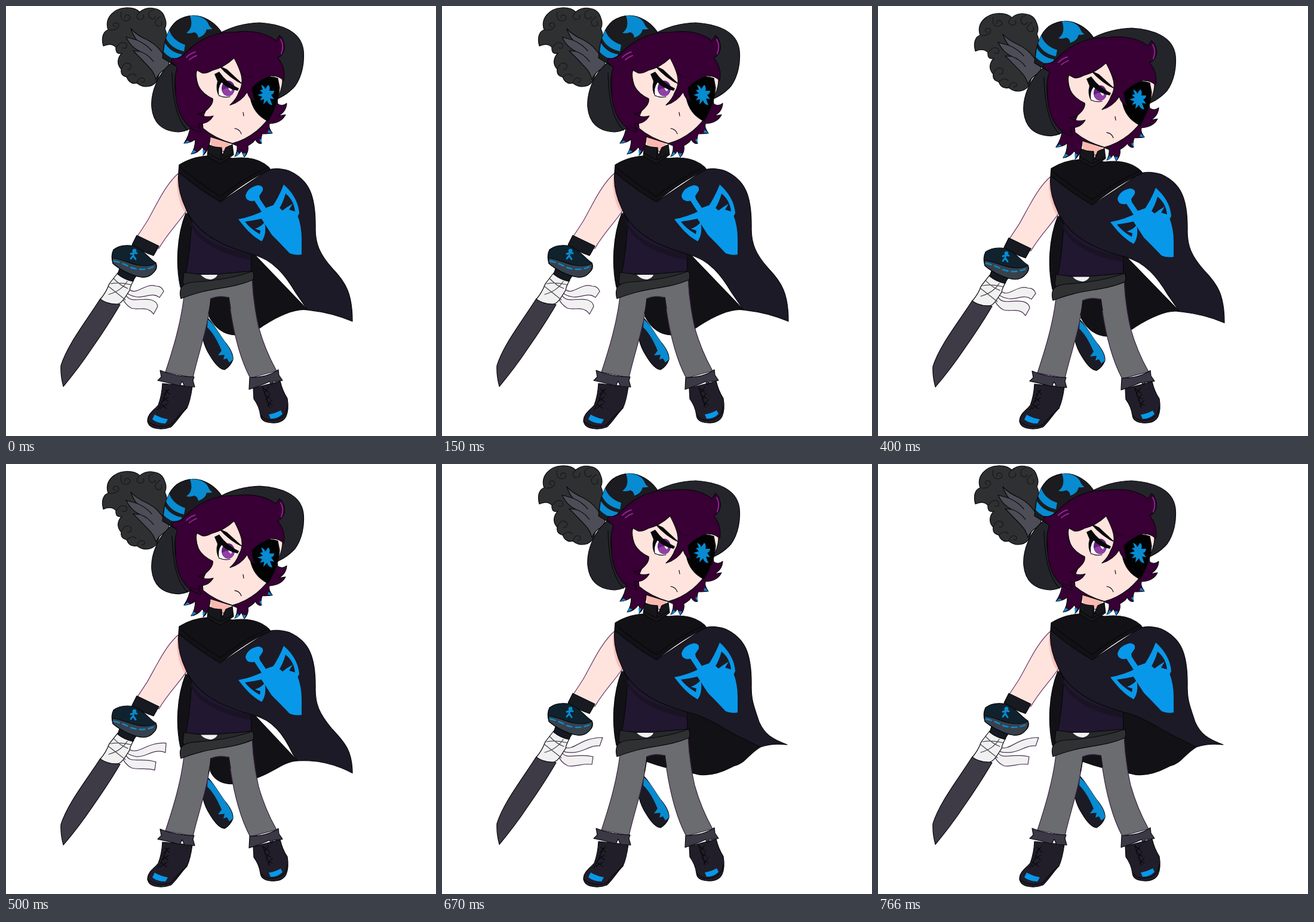
Recreate the animation shown at these times as an HTML page. Size 720x720 px, loop 830 ms.

```html
<!DOCTYPE html>
<html lang="en">
<head>
<meta charset="utf-8">
<title>Swordsman idle</title>
<style>
html, body { margin: 0; width: 100%; height: 100%; overflow: hidden; background: #fff }
svg { display: block; width: 100vw; height: 100vh }
.line { fill: none }
.blue { fill: #0898ea; stroke: none }
.dim { fill: #088bd0; stroke: none }
.skin { fill: #ffe4de }
.hair { fill: #380034 }
.boot { fill: #211e2a }
.cuff { fill: #3b3945 }
.ribbon { fill: #f1f1f1; stroke: #49304f }
</style>
</head>
<body>
<svg viewBox="0 0 720 720">
<g id="figure" stroke="#08080b" stroke-width="1.2" stroke-linejoin="round" stroke-linecap="round">

  <!-- cape lining and scabbard -->
  <path id="lining" fill="#121216"/>
  <path fill="#1b1b25" d="M337 522 C345 528 357 550 366 562 Q381 580 380 592 Q376 603 366 609 C356 608 348 596 342 586 Q333 572 330 558Z"/>
  <path class="dim" d="M338 525 C350 534 357 550 367 563 Q380 580 380 592 L374 597 370 590 364 592 366 584 355 585 361 577 357 568 C351 555 345 546 337 538Z"/>

  <!-- legs -->
  <path fill="#6a6c6f" stroke="#3f2347" d="M298 486 L412 456 C413 480 416 507 423 538 Q434 577 453 611 L409 623 C391 589 380 546 373 488 Q356 484 343 490 C339 535 324 575 313 622 L267 613 C280 573 293 531 298 486Z"/>
  <path class="line" d="M343 490 Q342 504 339 515 M373 488 L376 507"/>
  <path class="boot" d="M262 632 L312 637 C310 651 306 667 303 673 C294 682 285 697 276 705 Q263 710 250 707 Q237 704 237 693 C238 682 249 676 255 668 Q261 652 262 632Z"/>
  <path class="line" d="M270 643 Q259 670 254 676 M237 695 Q253 709 276 701 Q290 684 303 673 M266 642l8 8m-1-8l-9 9m-1 4l9 8m0-8l-11 8m-1 4l9 7m1-8l-12 8"/>
  <path class="cuff" d="M258 610 Q284 621 315 621 L313 627 316 638 299 637 295 628 291 636 Q273 631 254 627 L260 621Z"/>
  <path class="blue" d="M249 684 Q259 690 271 692 L267 699 Q253 699 245 692Z"/>
  <path class="boot" d="M414 640 L459 628 Q463 645 471 657 Q474 675 469 687 Q463 699 445 698 Q427 697 426 685 Q424 670 415 658Z"/>
  <path class="line" d="M429 637 Q437 657 441 672 M427 685 Q433 696 452 693 Q469 689 471 670 M431 640l9 7m0-9l-8 11m1 3l10 5m-1-8l-7 11m2 3l9 5m0-9l-8 11"/>
  <path class="cuff" d="M408 622 Q438 622 456 609 L457 618 463 627 447 629 445 634 441 629 Q426 636 407 642Z"/>
  <path class="blue" d="M440 684 Q451 682 460 677 L463 683 Q454 692 443 691Z"/>

  <!-- torso and belt -->
  <path fill="#211730" d="M303 346 L311 360 C309 395 307 420 301 447 L341 450 411 444 410 410 355 370Z"/>
  <path fill="#191323" stroke="none" d="M305 349 C317 390 363 408 410 415 L410 425 C360 416 326 398 310 369Z"/>
  <path fill="#28292b" d="M298 446 L330 450 354 449 411 444 413 452 300 470 296 463Z"/>
  <path fill="#f1f1f1" stroke="none" d="M326 450 H354 Q352 456 343 458 Q332 457 326 450Z"/>
  <path fill="#303133" d="M293 472 Q298 463 318 462 C350 460 386 454 413 444 Q416 451 414 458 C387 471 352 472 327 479 Q308 484 293 490 Q290 481 293 472Z"/>

  <!-- arm -->
  <path class="skin" stroke="#6d3367" d="M290 279 C267 298 251 335 236 361 L219 387 256 406 C271 380 289 363 302 343 Q293 317 290 279Z"/>
  <path fill="#fbc1bd" stroke="none" d="M289 281 Q286 288 286 298 Q288 329 299 345 L303 340 Q294 317 292 290Z"/>

  <!-- sword -->
  <path fill="#3e3b47" d="M158 490 L191 500 C176 526 160 550 144 573 Q122 606 96 637 Q91 618 92 602 C103 567 132 531 158 490Z"/>
  <path id="ribbonTop" class="ribbon"/>
  <path id="ribbonLow" class="ribbon"/>
  <path fill="#f1f1f1" d="M187 447 L214 459 Q208 469 207 476 C200 487 194 498 187 499 Q171 500 158 491 Q168 479 173 465Z"/>
  <path class="line" stroke="#454149" d="M180 456 Q191 468 204 473 M175 465 Q192 462 210 467 M171 469 Q190 484 200 492 M203 461 Q193 477 172 483"/>
  <path fill="#151922" d="M190 440 L218 452 212 461 Q198 458 187 449Z"/>
  <path fill="#171a20" d="M219 384 L256 402 247 418 Q227 411 211 400Z"/>
  <path fill="#10222e" d="M180 408 Q193 398 214 402 C232 409 240 424 251 430 Q255 439 247 446 Q239 455 227 454 C207 451 188 439 179 431 Q175 418 180 408Z"/>
  <path fill="#38414b" d="M178 422 C193 423 205 431 222 434 Q238 437 251 431 Q254 440 246 447 Q239 455 227 454 C207 451 188 439 179 431Z"/>
  <path class="line" stroke="#088bd0" stroke-width="2.4" stroke-dasharray="9 6" d="M181 427 Q195 430 207 437 Q227 445 246 437"/>
  <path class="line" stroke="#088bd0" stroke-width="3" d="M214 410 L213 418 209 423 M213 418 L217 424 M209 415 Q214 413 219 414"/>
  <circle class="dim" cx="215" cy="410" r="3.4"/>

  <!-- neck, cape and emblem -->
  <path id="cape" fill="#1c1a26"/>
  <path fill="#f9b9b1" stroke="none" d="M342 210 L377 223 373 240 358 246 343 236Z"/>
  <path fill="#121216" d="M290 266 Q313 252 338 251 L380 255 Q418 250 440 270 L443 274 C413 287 382 309 359 328 C336 315 311 297 289 278Z"/>
  <path class="line" d="M291 270 Q326 298 359 319 Q395 290 438 270"/>
  <path fill="#17171b" d="M339 232 Q348 237 361 237 L362 251 368 237 379 232 381 249 Q370 257 359 264 Q347 258 337 251Z"/>
  <path class="line" d="M338 246 Q350 254 360 258 L380 246 M360 239 V258 M363 243 l4 2 M362 249 l4 2"/>
  <g class="blue">
    <path d="M401 318 Q404 304 422 300 Q432 301 430 309 L424 318 425 323 435 338 452 332 459 339 467 346 488 350 Q495 369 495 390 L495 416 Q485 418 475 414 Q460 398 445 383 L425 352 429 346 416 326 Q403 329 401 318Z"/>
    <path fill-rule="evenodd" d="M435 341 Q412 353 389 357 C400 371 410 384 428 394 Q437 382 433 362 Q428 369 417 373 L426 376 425 382 Q409 373 400 361 Q417 359 436 354Z M444 339 Q457 320 465 299 C479 311 490 328 491 347 Q488 355 480 356 Q471 350 461 344 Q471 336 480 331 L474 341 484 344 Q482 325 468 314 Q464 330 455 343Z"/>
  </g>

  <!-- plume -->
  <path fill="#2f3031" d="M163 67 C159 53 163 42 171 40 C164 20 181 4 200 3 Q216 2 224 10 Q234 1 248 4 Q262 6 266 20 Q270 30 266 38 Q272 50 267 60 L272 96 Q257 108 254 122 C249 136 231 139 219 129 Q207 132 202 119 Q191 116 193 106 C183 95 189 84 194 79 Q183 82 184 69 Q176 61 163 67Z"/>
  <path class="line" stroke="#171719" d="M173 40 q12 2 16-7q-1-7-8-4q-4 4 2 6M193 10 q-3 15 9 15q10-4 3-10q-7-1-6 5M224 10q-10 9 0 13q9-1 6-8M248 6q-12 3-8 13q7 6 10-1M258 18q-14 9-4 16q9 0 6-8M185 69q9-13 17-5q2 9-7 6M193 106q6-16 16-8q2 9-6 8M202 119q10-9 16-2M219 129q4-13 13-7q1 7-5 5"/>
  <path fill="#4c4d56" d="M273 94 C258 74 254 66 237 57 C226 52 217 47 209 38 Q213 50 219 57 L201 52 Q209 69 224 76 L213 75 Q229 91 240 103 Q248 111 251 123 Q256 110 272 103Z"/>
  <path class="line" d="M219 57 Q235 64 244 75 M224 76 Q237 80 247 93"/>

  <!-- hat -->
  <path fill="#24252a" d="M276 96 C254 114 242 145 244 170 Q248 209 289 211 Q310 209 322 194 L440 160 Q466 154 484 134 C496 117 500 94 498 74 C494 42 460 30 425 28 Q388 29 357 46Z"/>
  <path fill="#1b1b20" d="M262 87 Q265 42 286 25 Q306 12 327 18 Q348 25 361 44 L325 78 285 101Z"/>
  <path class="dim" d="M273 40 Q279 58 300 65 L298 76 Q276 71 268 54Z M266 62 Q276 78 295 81 L289 91 Q273 87 264 77Z M308 16 Q330 15 338 28 Q341 36 346 38 Q340 40 336 39 Q334 49 322 53 Q321 45 315 44 Q308 47 302 45 Q315 36 308 16Z"/>
  <path class="line" d="M278 112 C279 151 284 188 304 208"/>

  <!-- hair behind the face -->
  <path class="hair" d="M287 103 C278 130 283 178 309 200 Q307 217 298 230 Q310 229 317 223 Q317 238 310 248 Q321 247 329 236 Q333 243 330 250 Q341 241 342 219 L377 230 387 234 Q388 244 383 252 Q391 249 394 242 L399 253 Q407 244 405 234 Q417 227 417 223 Q422 232 428 230 Q426 222 429 214 Q440 214 446 213 Q439 204 441 197 Q461 196 468 182 L456 184 Q469 177 470 163 Q463 169 455 164 L450 125Z"/>
  <path class="dim" d="M298 230 l6-5 4 3zM310 248l4-7 5 3zM330 250l-1-9 5 1zM383 252l5-8 3 4zM399 253l-3-7 6 1zM428 230l-4-6 4-2zM446 213l-6-6-2 5z"/>

  <!-- face -->
  <path class="skin" d="M320 105 Q393 67 461 105 Q467 129 456 151 C452 177 436 195 420 209 Q400 225 379 230 Q350 222 330 205 Q327 189 335 174 L341 155 Q319 142 318 113Z"/>
  <path fill="#fff" stroke="none" d="M357 124 L387 138 Q382 150 370 152 Q358 153 355 146Z"/>
  <ellipse cx="372" cy="138" rx="11" ry="13" fill="#652080" stroke="none"/>
  <path fill="#9140a5" stroke="none" d="M362 141 Q372 134 382 141 Q379 151 372 151 Q364 150 362 141Z"/>
  <path fill="#fff" stroke="none" d="M376 132 q4 4 1 11 q-5-3-5-8z"/>
  <path fill="#08070a" stroke="none" d="M349 114 L357 110 Q370 129 390 138 L388 142 Q371 139 361 128 Q354 137 357 152 Q350 140 354 126Z M355 99 L370 106 398 132 Q376 123 355 99Z"/>
  <path class="line" d="M357 150 Q365 154 375 152 M397 178 L398 184 M383 205 Q391 206 394 214"/>
  <path fill="#020203" d="M414 128 Q435 114 455 121 L458 137 Q456 163 439 193 Q414 181 409 153Z"/>
  <path class="dim" d="M427 132 Q433 134 434 139 L439 132 Q443 135 441 142 L449 142 Q449 147 444 149 L449 156 442 155 446 166 Q439 165 437 158 L431 165 432 156 425 158 429 152 421 149 430 146 425 141 430 140Z"/>

  <!-- fringe and side locks -->
  <path class="hair" d="M277 94 Q277 86 282 88 Q293 88 303 76 C324 54 354 43 382 44 Q427 38 452 58 L458 49 Q468 58 466 73 Q464 82 455 87 Q469 103 465 125 Q457 116 443 117 Q423 124 412 137 Q413 150 417 160 Q407 156 404 144 Q393 161 375 166 Q386 156 390 144 C401 127 393 108 382 87 Q365 103 345 108 Q334 114 328 112 L319 107 Q317 121 322 134 Q330 148 346 155 Q348 164 335 175 Q327 181 321 180 Q333 188 347 184 Q339 198 322 197 L326 211 C303 207 283 181 284 137 Q281 118 287 103Z"/>
  <path class="line" stroke="#8a288d" stroke-width="2" d="M302 86 Q309 79 317 77 M307 90 Q313 85 319 83 M460 56 Q466 66 461 80"/>
  <path class="line" stroke="#240020" d="M393 110 Q402 121 410 119 M309 200 Q320 205 326 204"/>
</g>
</svg>
<script>
const LOOP = 830, GROUND = 708;
const $ = id => document.getElementById(id);

// Resting, lifting and fully blown poses of the loose cloth.
// The front's lower edge follows `bend` to `corner`, then `hem` to the far side.
const poses = [
  {
    bend: "448 425 468 451 485 480", corner: "505 509",
    hem: "Q545 513 580 528 C580 481 569 463 546 439 C525 415 518 398 518 373",
    lining: "C485 505 454 520 431 535 Q408 552 384 551 Q356 550 340 520",
    top: "M207 475 C219 485 233 463 251 469 Q261 469 264 478 L257 488 C244 478 232 490 218 487 Q207 485 202 480Z",
    low: "M200 482 C206 499 226 488 243 492 Q253 495 254 503 L247 516 C237 501 222 510 210 506 Q198 499 195 488Z"
  },
  {
    bend: "448 425 465 450 480 482", corner: "488 494",
    hem: "Q537 491 580 515 C580 475 565 461 545 439 C524 413 518 398 518 373",
    lining: "C464 495 444 517 414 525 Q394 535 372 533 Q350 530 342 511",
    top: "M207 475 C223 484 235 462 268 464 L267 480 C247 472 234 489 218 487 Q207 485 202 480Z",
    low: "M200 482 C206 501 224 487 251 496 L249 510 C234 505 222 510 210 506 Q198 499 195 488Z"
  },
  {
    bend: "450 425 475 447 507 461", corner: "533 474",
    hem: "Q552 467 578 470 C551 460 540 452 531 432 C523 407 518 398 518 373",
    lining: "C513 486 507 502 488 506 Q449 527 421 518 Q377 511 342 498",
    top: "M207 475 C222 479 233 458 269 458 L264 472 C247 470 236 484 218 483 Q207 484 202 480Z",
    low: "M200 482 C209 497 224 483 253 490 L251 503 C234 500 222 509 210 505 Q198 499 195 488Z"
  }
];

function setCloth({ bend, corner, hem, lining, top, low }) {
  const shapes = {
    cape: `M289 279 Q286 307 301 339 C320 384 368 404 413 416 C${bend} L${corner} ${hem}
      C519 316 507 291 474 276 Q455 270 440 274 L359 328Z`,
    lining: `M301 347 C286 385 284 433 292 471 L342 480 330 370Z
      M${corner} ${lining} L340 480 410 410Z`,
    ribbonTop: top,
    ribbonLow: low
  };
  for (const id in shapes) $(id).setAttribute("d", shapes[id]);
}

function draw(now) {
  const t = now % LOOP;
  const squash = t >= 250 && t < 580 ? 0.9865 : 1;
  $("figure").setAttribute("transform", `matrix(1 0 0 ${squash} 0 ${GROUND * (1 - squash)})`);
  setCloth(poses[t < 500 ? 0 : t < 670 ? 1 : 2]);
  requestAnimationFrame(draw);
}
draw(performance.now());
</script>
</body>
</html>
```
